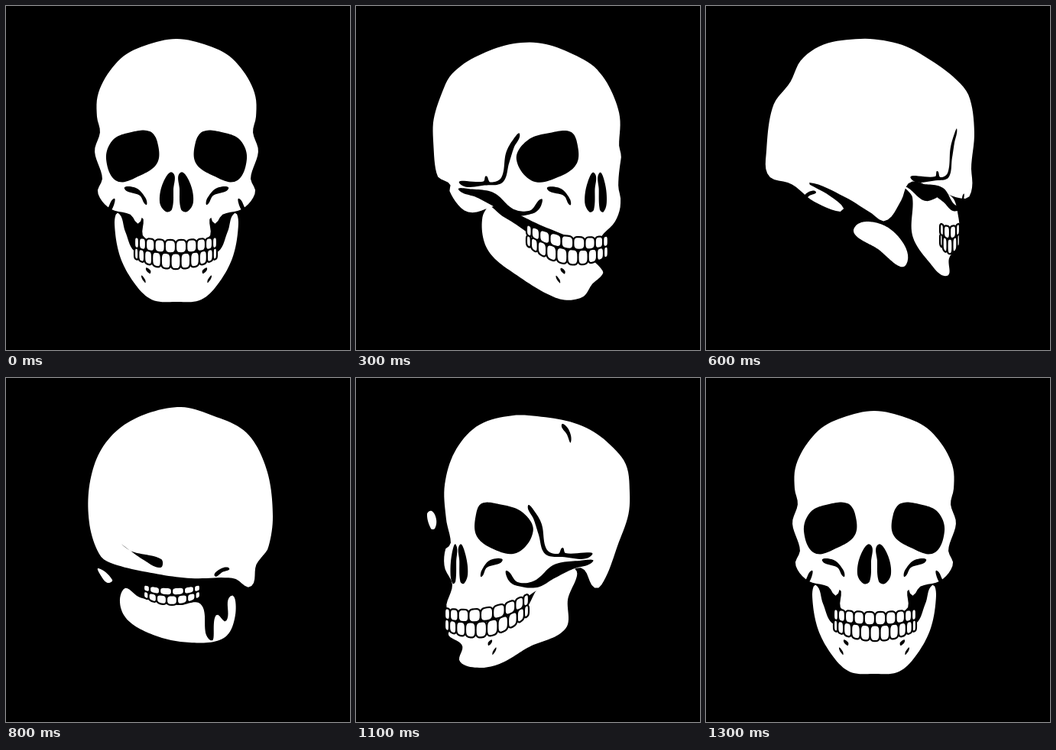
An HTML page with a canvas that plays this animation: 450 px wide and 450 px high, repeating every 1350 ms.

```html
<!DOCTYPE html>
<html>
<head>
<meta charset="utf-8">
<style>
html, body { margin: 0; height: 100%; overflow: hidden; background: #000; }
canvas { display: block; }
</style>
</head>
<body>
<canvas width="450" height="450"></canvas>
<script>
const LOOP = 1350, STEP = 50, DETAIL = 160, DEG = Math.PI / 180;
const ctx = document.querySelector('canvas').getContext('2d');
const parse = text => text.split(' ').map(s => s.split(',').map(Number));
const flip = (points, width) => points.map(([x, y]) => [width - x, y]);
const symmetric = (text, width) => [...parse(text), ...flip(parse(text), width).reverse().slice(1, -1)];

// view: centre x, yaw in degrees, lift; teeth: left, right, top, height scale, count.
// The bone is a loose white piece, a single point where it is out of sight.
const makePose = (at, view, teeth, head, jaw, bone) => ({ at, view, teeth, head, jaw, bone: parse(bone) });
const front = makePose(0, [223, 0, 0], [168, 276, 302, 1, 10],
  symmetric('223,43 190,49 156,64 133,89 120,117 119,145 123,165 116,190 126,225 120,244 136,265 163,273 173,285 179,276 181,303 223,312', 446),
  symmetric('223,387 193,385 172,368 150,330 142,285 147,271 156,295 170,322 223,330', 446), '135,255');
const turned = makePose(200, [227, 22, 0], [201, 309, 301, 1, 10],
  parse('210,48 250,51 290,68 308,80 339,129 344,180 340,200 341,250 308,275 308,303 250,306 205,298 199,275 168,264 147,267 129,244 137,234 118,229 110,180 113,125 135,90 147,75 180,55'),
  parse('250,387 225,383 180,345 152,312 149,272 172,271 190,305 250,332 306,320 306,340 297,375'),
  '114,248 125,256 137,271 122,268');
const profile = makePose(400, [220, 79, 0], [248, 345, 298, 0.95, 8],
  parse('240,47 290,64 315,80 336,106 347,150 343,190 350,208 341,245 345,262 341,302 290,302 249,276 215,249 187,245 175,252 153,274 113,238 97,215 92,150 110,105 120,82 145,67 190,52'),
  parse('300,378 235,348 200,317 192,275 187,246 250,275 258,314 338,328 325,345 326,372'), '190,270');
const away = makePose(600, [214, 120, -6], [306, 332, 284, 0.95, 4],
  parse('200,43 232,45 262,53 294,71 325,94 344,118 351,165 347,210 348,238 340,252 300,240 268,230 255,255 235,281 215,270 180,249 135,231 160,247 180,264 174,269 140,255 112,233 82,222 79,190 88,130 110,100 125,70 155,50'),
  parse('315,353 292,335 270,300 270,250 260,236 287,255 318,247 330,275 330,310 318,330'),
  '194,290 240,291 262,338 225,318');
const back = makePose(800, [228, 185, 0], [180, 254, 270, 0.6, 6],
  parse('225,38 270,49 315,72 341,120 349,180 343,222 333,236 327,245 320,273 298,262 240,262 185,254 140,243 123,232 109,190 110,135 128,88 165,55'),
  parse('240,346 190,335 154,310 154,276 175,287 225,297 255,296 267,343 275,310 288,318 294,285 300,310 285,340'),
  '121,249 139,264 133,268 125,260');
const returning = makePose(1100, [236, 301, 0], [116, 226, 301, 1, 9],
  parse('205,49 245,51 279,57 305,67 330,85 353,113 358,150 356,180 343,217 326,262 313,275 296,249 275,256 233,280 215,292 170,306 121,305 126,270 116,248 117,224 124,217 118,185 116,140 130,95 160,62'),
  parse('162,379 136,371 139,350 121,333 150,325 220,302 240,273 285,249 277,290 274,328 226,352 190,373'),
  '93,178 99,174 105,185 103,197 98,197');

function mirror({ view: [x, yaw, lift], teeth: [x0, x1, ...rest], head, jaw, bone }, at, width) {
  return { at, view: [width - x, 360 - yaw, lift], teeth: [width - x1, width - x0, ...rest],
    head: flip(head, width), jaw: flip(jaw, width), bone: flip(bone, width) };
}
const poses = [front, turned, profile, away, back,
  mirror(away, 950, 468), mirror(profile, 1050, 455), returning, mirror(front, 1300, 443)];

// Black markings lie on a cylinder: traced where they are best seen, then turned with the head.
const features = [];
function mark(pose, radius, text, { paired = false, limit = 65 } = {}) {
  const [cx, yaw, lift] = pose.view;
  const points = parse(text).map(([x, y]) => [Math.asin((x - cx) / radius) / DEG - yaw, y - lift]);
  for (const side of paired ? [1, -1] : [1]) {
    const turnedPoints = points.map(([a, y]) => [a * side, y]);
    const centre = turnedPoints.reduce((s, p) => s + p[0], 0) / points.length;
    features.push({ radius, limit, centre, points: turnedPoints });
  }
}
const paired = true;
mark(front, 110, '131,200 140,175 164,165 188,164 198,178 198,205 175,222 145,229', { paired });
mark(front, 120, '218,218 219,240 217,266 209,269 201,256 206,230', { paired, limit: 76 });
mark(front, 115, '155,239 170,238 183,252 183,260 175,248', { paired });
mark(front, 100, '183,343 189,346 188,350', { paired });
mark(front, 100, '177,353 182,358 182,362', { paired });
mark(profile, 125, '273,167 264,176 256,192 250,224 235,230 229,222 225,229 187,232 230,234 252,230 260,205 266,185', { paired });
mark(profile, 125, '185,240 205,239 240,244 265,265 285,267 297,252 296,263 288,271 262,274 240,262 215,250', { paired });
mark(back, 125, '152,218 165,227 203,237 202,248 180,238');
mark(back, 125, '273,259 280,250 292,249 283,254');
mark(returning, 125, '269,61 278,67 281,84 276,74');

function hermite(a, b, ma, mb, u) {
  const v = 1 - u;
  return v * v * (1 + 2 * u) * a + u * u * (3 - 2 * u) * b + u * v * v * ma - u * u * v * mb;
}

const span = (a, b) => Math.hypot(b[0] - a[0], b[1] - a[1]);

// Smooth closed curve through the points, as a dense list.
function curve(p) {
  const n = p.length, out = [];
  const tangent = i => {
    const a = p[(i + n - 1) % n], b = p[(i + 1) % n], d = span(a, b) || 1;
    return [(b[0] - a[0]) / d, (b[1] - a[1]) / d];
  };
  for (let i = 0; i < n; i++) {
    const j = (i + 1) % n, ta = tangent(i), tb = tangent(j), len = span(p[i], p[j]);
    for (let k = 0; k < 12; k++) out.push([0, 1].map(c => hermite(p[i][c], p[j][c], ta[c] * len, tb[c] * len, k / 12)));
  }
  return out;
}

// Evenly spaced clockwise points from the top (or bottom), so outlines can blend.
function sample(points, fromBottom) {
  let p = curve(points);
  const area = p.reduce((s, a, i) => {
    const b = p[(i + 1) % p.length];
    return s + a[0] * b[1] - a[1] * b[0];
  }, 0);
  if (area < 0) p.reverse();
  const sign = fromBottom ? -1 : 1;
  const start = p.reduce((best, a, i) => a[1] * sign < p[best][1] * sign ? i : best, 0);
  p = p.slice(start).concat(p.slice(0, start + 1));
  const dist = [0];
  for (let i = 1; i < p.length; i++) dist[i] = dist[i - 1] + span(p[i - 1], p[i]);
  const out = [];
  for (let k = 0, i = 0; k < DETAIL; k++) {
    const d = dist[p.length - 1] * k / DETAIL;
    while (i < p.length - 2 && dist[i + 1] < d) i++;
    const u = (d - dist[i]) / (dist[i + 1] - dist[i] || 1);
    out.push(p[i][0] + (p[i + 1][0] - p[i][0]) * u, p[i][1] + (p[i + 1][1] - p[i][1]) * u);
  }
  return out;
}

const tracks = {
  view: poses.map(p => p.view),
  teeth: poses.map(p => p.teeth),
  head: poses.map(p => sample(p.head)),
  jaw: poses.map(p => sample(p.jaw, true)),
  bone: poses.map(p => sample(p.bone))
};

// Smooth cyclic interpolation between poses; the yaw gains a full turn per loop.
function blend(key, t) {
  const n = poses.length, track = tracks[key];
  const i = poses.filter(p => p.at <= t).length - 1;
  const time = k => poses[(k + n) % n].at + LOOP * Math.floor(k / n);
  const get = (k, c) => track[(k + n) % n][c] + (key === 'view' && c === 1 ? 360 * Math.floor(k / n) : 0);
  const slope = (k, c) => {
    const h1 = time(k) - time(k - 1), h2 = time(k + 1) - time(k);
    return ((get(k, c) - get(k - 1, c)) / h1 * h2 + (get(k + 1, c) - get(k, c)) / h2 * h1) / (h1 + h2);
  };
  const h = time(i + 1) - time(i), u = (t - time(i)) / h;
  return track[i].map((a, c) => hermite(a, get(i + 1, c), slope(i, c) * h, slope(i + 1, c) * h, u));
}

function fill(points, color) {
  ctx.beginPath();
  for (let i = 0; i < points.length; i += 2) ctx.lineTo(points[i], points[i + 1]);
  ctx.fillStyle = color;
  ctx.fill();
}

function drawFeatures([cx, yaw, lift]) {
  for (const { radius, limit, centre, points } of features) {
    if (Math.cos((centre + yaw) * DEG) < Math.cos(limit * DEG)) continue;
    const placed = points.map(([a, y]) => {
      const angle = ((a + yaw) % 360 + 540) % 360 - 180;
      return [cx + radius * Math.sin(Math.max(-90, Math.min(90, angle)) * DEG), y + lift];
    });
    fill(curve(placed).flat(), '#000');
  }
}

// Two rows of rounded teeth, narrower towards the ends; the far molars rise in side view.
function drawTeeth([x0, x1, top, scale, count], yaw) {
  const arc = 1.27, gap = 1.1, side = Math.sin(yaw * DEG), facing = Math.cos(yaw * DEG) > -0.2;
  const height = (row, x) => {
    const v = 2 * (x - x0) / (x1 - x0) - 1, bulge = 1 - v * v;
    const rise = facing ? 26 * side * side * ((1 - v * Math.sign(side)) / 2) ** 2 : 0;
    return top + 4 * bulge - rise + scale * row * (14 + (row + 1) * 1.7 * bulge);
  };
  const rows = new Path2D();
  for (const row of [0, 1]) {
    const n = Math.round(count) + row;
    const edge = i => x0 + (x1 - x0) * (1 + Math.sin(arc * (2 * i / n - 1)) / Math.sin(arc)) / 2;
    for (let i = 0; i < n; i++) {
      const mid = (edge(i) + edge(i + 1)) / 2, half = Math.max(0.5, (edge(i + 1) - edge(i)) / 2 - gap);
      for (let k = 0; k < 24; k++) {
        const c = Math.cos(k * 15 * DEG), s = Math.sin(k * 15 * DEG);
        const round = w => Math.sign(w) * Math.abs(w) ** 0.6;
        const x = mid + half * round(c), a = height(row, x) + gap, b = height(row + 1, x) - gap;
        rows[k ? 'lineTo' : 'moveTo'](x, (a + b) / 2 + (b - a) / 2 * round(s));
      }
      rows.closePath();
    }
  }
  ctx.lineWidth = 4.4;
  ctx.strokeStyle = '#000';
  ctx.stroke(rows);
  ctx.fillStyle = '#fff';
  ctx.fill(rows);
}

function draw(now) {
  const t = Math.floor(now % LOOP / STEP) * STEP, view = blend('view', t);
  ctx.fillStyle = '#000';
  ctx.fillRect(0, 0, 450, 450);
  for (const key of ['head', 'jaw', 'bone']) fill(blend(key, t), '#fff');
  drawFeatures(view);
  drawTeeth(blend('teeth', t), view[1]);
}

let begin;
function tick(now) {
  begin ??= now;
  draw(now - begin);
  requestAnimationFrame(tick);
}
draw(0);
requestAnimationFrame(tick);
</script>
</body>
</html>
```
